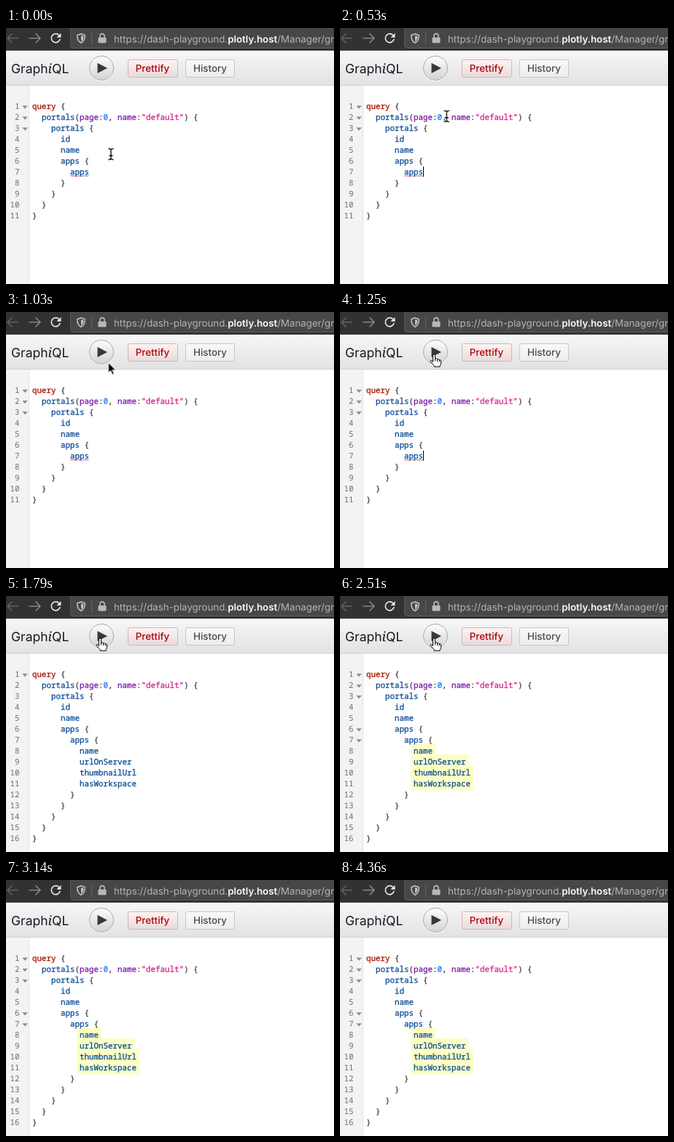
Write an HTML page that moves like this. It is 450 by 351 pixels and loops after 4.42 s.

```html
<!DOCTYPE html>
<html lang="en">
<head>
<meta charset="utf-8">
<title>GraphiQL query</title>
<style>
  html, body { margin: 0; width: 100%; height: 100%; overflow: hidden; background: #fff; }
  svg { display: block; width: 100vw; height: 100vh; }
  text { white-space: pre; text-rendering: geometricPrecision; }
  .ui { font-family: Inter, "Open Sans", sans-serif; }
  .mono { font: 10.833px "Noto Sans Mono", "Liberation Mono", monospace; }
  .code { fill: currentColor; stroke: currentColor; stroke-width: .3; }
  .keyword { color: #a81400; }
  .property { color: #0c4c98; }
  .argument { color: #7a1aa8; }
  .number { color: #1a78f5; }
  .string { color: #d2278a; }
  .punct { color: #444; }
  .line { fill: #6c6c6c; text-anchor: end; }
  .fold { fill: #8c8c8c; }

  .timed { animation: 4420ms step-end infinite; }
  #before { animation-name: before; }
  #after { animation-name: after; }
  #newFolds { animation-name: folds; }
  #pressed { animation-name: pressed; }
  #caret { animation-name: caret; }
  #beam { animation-name: beam; }
  #arrow { animation-name: arrow; }
  #hand { animation-name: hand; }
  #glow { animation-name: glow; animation-timing-function: linear; }
  #pointer { animation-name: travel; animation-timing-function: ease-in-out; }

  @keyframes before { 0% { opacity: 1 } 40.49%, 100% { opacity: 0 } }
  @keyframes after { 0% { opacity: 0 } 40.49%, 100% { opacity: 1 } }
  @keyframes folds { 0% { opacity: 0 } 50%, 100% { opacity: 1 } }
  @keyframes pressed { 0% { opacity: 0 } 36.42% { opacity: 1 } 40.49%, 100% { opacity: 0 } }
  @keyframes caret {
    0% { opacity: 0 } 5.88% { opacity: 1 } 12.4% { opacity: 0 }
    24.4% { opacity: 1 } 36.42%, 100% { opacity: 0 }
  }
  @keyframes glow { 0%, 43% { opacity: 0 } 43.66% { opacity: .2 } 52.49%, 100% { opacity: 1 } }
  @keyframes beam {
    0% { opacity: 1 } 17.87% { opacity: 0 } 65.3% { opacity: 1 } 71.03%, 100% { opacity: 0 }
  }
  @keyframes arrow {
    0% { opacity: 0 } 17.87% { opacity: 1 } 23.5% { opacity: 0 }
    64.7% { opacity: 1 } 65.3%, 100% { opacity: 0 }
  }
  @keyframes hand { 0% { opacity: 0 } 23.5% { opacity: 1 } 64.7%, 100% { opacity: 0 } }
  @keyframes travel {
    0%, 5.88% { transform: translate(144px, 173px) }
    17.2% { transform: translate(148px, 82px) }
    19.68% { transform: translate(147px, 76px) }
    28.28% { transform: translate(129px, 58px) }
    62.9% { transform: translate(129px, 58px); animation-timing-function: cubic-bezier(.42, 0, .8, .8) }
    71.04%, 100% { transform: translate(315px, 362px) }
  }
</style>
</head>
<body>
<svg viewBox="0 0 450 351" preserveAspectRatio="none">
  <defs>
    <linearGradient id="barFill" x2="0" y2="1"><stop stop-color="#f7f7f7"/><stop offset="1" stop-color="#e2e2e2"/></linearGradient>
    <linearGradient id="playFill" x2="0" y2="1"><stop stop-color="#fdfdfd"/><stop offset="1" stop-color="#d2d3d6"/></linearGradient>
    <linearGradient id="pressFill" x2="0" y2="1"><stop stop-color="#e4e4e4"/><stop offset="1" stop-color="#c8c8c8"/></linearGradient>
    <linearGradient id="errorFill" x2="0" y2="1"><stop stop-color="#fdf3f3"/><stop offset="1" stop-color="#e9dadb"/></linearGradient>
    <linearGradient id="plainFill" x2="0" y2="1"><stop stop-color="#f9f9f9"/><stop offset="1" stop-color="#ececec"/></linearGradient>
    <path id="triangle" d="M22.300 106.500h7.600l-3.800 4.300z"/>
    <path id="beamLine" d="M-3-7.500q3 0 3 2.200V5.300q0 2.200-3 2.200M3-7.500q-3 0-3 2.200M3 7.500q-3 0-3-2.200M-2 2h4"/>
  </defs>
  <rect width="450" height="351" fill="#fff"/>

  <!-- browser bar -->
  <rect width="450" height="31" fill="#323234"/>
  <rect x="88.500" y="-6" width="380" height="33.500" rx="4" fill="#474749" stroke="#5c5c5f"/>
  <rect x="117" y="6" width="1" height="17" fill="#636366"/>
  <g fill="none" stroke-width="1.7" stroke-linecap="round" stroke-linejoin="round">
    <path d="M16.500 14H2M8 8l-6 6 6 6" stroke="#616163"/>
    <path d="M32 14h15M41 8l6 6-6 6" stroke="#858587"/>
    <path d="M72.800 10A6 6 0 1 0 74 15.500" stroke="#e6e6e8"/>
    <path d="M103 8l5.300 2c0 5-1.300 8.500-5.300 10.500-4-2-5.300-5.500-5.300-10.500z" stroke="#c4c4c6" stroke-width="1.500"/>
    <path d="M129 13v-2.200a3 3 0 0 1 6 0V13" stroke="#b8b8ba"/>
  </g>
  <path d="M75.500 7v6h-6z" fill="#e6e6e8"/>
  <path d="M103 10.200l3.400 1.300c-.1 3.300-1 5.500-3.400 7z" fill="#c4c4c6"/>
  <rect x="126.500" y="13" width="11" height="7.500" rx="1.300" fill="#b8b8ba"/>
  <g class="ui" font-size="13.300" fill="#b4b4b6">
    <text x="148" y="20">https://dash-playground.<tspan fill="#fbfbfe" font-weight="600">plotly.host</tspan>/Manager/gr</text>
  </g>

  <!-- toolbar -->
  <rect y="31" width="450" height="47" fill="url(#barFill)"/>
  <rect y="78" width="450" height="1" fill="#d0d0d0"/>
  <text class="ui" x="7" y="62" font-size="17.500" fill="#141823">Graph<tspan font-family="'Noto Serif', serif" font-style="italic" font-size="18">i</tspan>QL</text>
  <circle cx="131" cy="56" r="17" fill="#fff"/>
  <circle cx="131" cy="55" r="16.500" fill="url(#playFill)" stroke="#a9a9ab"/>
  <circle id="pressed" class="timed" cx="131" cy="55" r="16.500" fill="url(#pressFill)" stroke="#a0a0a2"/>
  <path d="M125.500 48l13.500 7-13.500 7z" fill="#383838"/>
  <g class="ui" font-size="13.400" font-weight="500" text-anchor="middle">
    <rect x="167.500" y="43.500" width="68" height="24" rx="2.500" fill="url(#errorFill)" stroke="#d3b4b6"/>
    <text x="201" y="60" fill="#b00008">Prettify</text>
    <rect x="246.500" y="43.500" width="67" height="24" rx="2.500" fill="url(#plainFill)" stroke="#c6c6c6"/>
    <text x="280" y="60" fill="#484848">History</text>
  </g>

  <!-- editor -->
  <rect y="79" width="31" height="272" fill="#f3f3f3"/>
  <rect x="31" y="79" width="1" height="272" fill="#e4e4e4"/>
  <use href="#triangle" class="fold"/>
  <g id="before" class="timed mono">
    <path id="squiggle" fill="none" stroke="#d8343c" stroke-width=".9"/>
  </g>
  <g id="after" class="timed mono">
    <g id="glow" class="timed" fill="#fbffc4"></g>
    <g id="newFolds" class="timed"></g>
  </g>
  <rect id="caret" class="timed" x="114" y="190" width="1" height="14" fill="#000"/>

  <!-- mouse pointer -->
  <g id="pointer" class="timed">
    <g id="beam" class="timed" fill="none" stroke-linecap="round">
      <use href="#beamLine" stroke="#fff" stroke-width="3"/>
      <use href="#beamLine" stroke="#000" stroke-width="1.300"/>
    </g>
    <path id="arrow" class="timed" d="M0 0v14l3.200-3 2.400 5.500 2.400-1.100-2.400-5.200H10z" fill="#000" stroke="#fff" stroke-linejoin="round"/>
    <path id="hand" class="timed" d="M-1.500 10V1.500a1.500 1.500 0 0 1 3 0V6q2.600-1 3 .8 2.300-.8 2.700.9 2.300-.4 2.300 1.500v3q0 1.800-1.300 3.300V17H.2v-1.300q-2.200-2.200-4.700-5.700c-1-1.600.5-2.500 1.700-1.300zM1.500 6v3M4.500 7v2.500M7.200 8v2" fill="#fff" stroke="#000" stroke-linejoin="round" stroke-linecap="round"/>
  </g>
</svg>
<script>
  const $ = id => document.getElementById(id);
  const lineStep = 15, indentStep = 13, charWidth = 6.5;

  function add(parent, tag, attrs, content = '') {
    const node = document.createElementNS('http://www.w3.org/2000/svg', tag);
    for (const name in attrs) node.setAttribute(name, attrs[name]);
    node.textContent = content;
    return parent.appendChild(node);
  }

  function tokenClass(token, next) {
    if (token === 'query') return 'keyword';
    if (token[0] === '"') return 'string';
    if (/^\d/.test(token)) return 'number';
    if (/^\w/.test(token)) return next === ':' ? 'argument' : 'property';
    return 'punct';
  }

  function drawCode(group, lines) {
    let depth = 0;
    lines.forEach((line, i) => {
      if (line === '}') depth--;
      const y = 111 + i * lineStep;
      add(group, 'text', { x: 18.5, y, class: 'line' }, i + 1);
      const text = add(group, 'text', { x: 36 + depth * indentStep, y });
      const tokens = line.match(/"[^"]*"|\w+|\s+|[^\w\s"]/g);
      tokens.forEach((token, j) =>
        add(text, 'tspan', { class: 'code ' + tokenClass(token, tokens[j + 1]) }, token));
      if (line.endsWith('{')) depth++;
    });
  }

  function drawFolds(group, rows) {
    for (const row of rows)
      add(group, 'use', { href: '#triangle', y: (row - 1) * lineStep, class: 'fold' });
  }

  const head = ['query {', 'portals(page:0, name:"default") {', 'portals {', 'id', 'name', 'apps {'];
  const leaves = ['name', 'urlOnServer', 'thumbnailUrl', 'hasWorkspace'];
  const close = count => Array(count).fill('}');

  $('squiggle').setAttribute('d', 'M88 203.5' + 'l1.5-1.5 1.5 1.5'.repeat(8) + 'l1.5-1.5');
  leaves.forEach((leaf, i) => add($('glow'), 'rect', {
    x: 97, y: 202 + i * lineStep, width: leaf.length * charWidth + 8, height: 19.5, rx: 2
  }));
  drawCode($('before'), [...head, 'apps', ...close(4)]);
  drawCode($('after'), [...head, 'apps {', ...leaves, ...close(5)]);
  drawFolds($('before'), [2, 3]);
  drawFolds($('newFolds'), [2, 3, 6, 7]);
</script>
</body>
</html>
```
